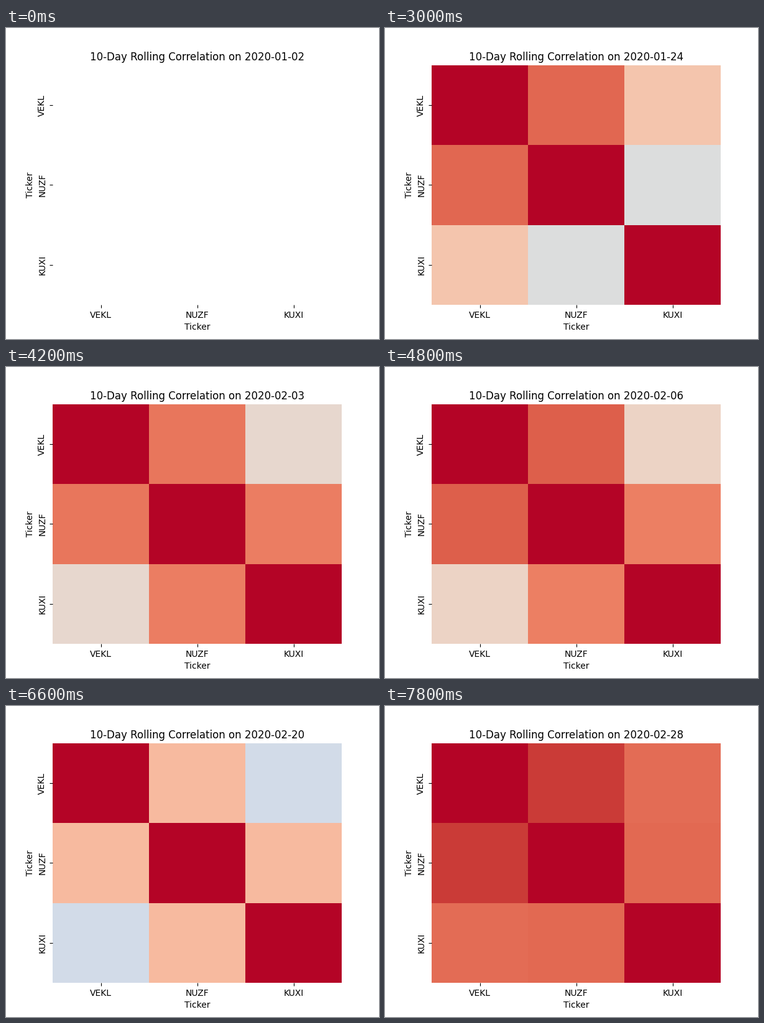
These frames come from a looping animation (600 by 500 pixels, 8 s). A matplotlib script:

```python
import numpy as np
import matplotlib.pyplot as plt
from matplotlib.animation import FuncAnimation

FRAMES = 40
WINDOW = 10
TICKERS = ["VEKL", "NUZF", "KUXI"]
HOLIDAYS = ["2020-01-20", "2020-02-17"]

# Turning points of the correlation of each pair of tickers
KEY_DAYS = [10, 15, 18, 21, 24, 29, 33, 35, 39]
PAIRS = {
    (0, 1): [0.838, 0.724, 0.876, 0.664, 0.75, 0.603, 0.315, 0.69, 0.875],
    (0, 2): [0.194, 0.245, 0.154, 0.083, 0.13, 0.083, -0.08, 0.454, 0.696],
    (1, 2): [-0.048, -0.007, -0.04, 0.63, 0.62, 0.52, 0.315, 0.655, 0.712],
}

dates = np.busday_offset("2020-01-02", np.arange(FRAMES), holidays=HOLIDAYS)


def correlation(day):
    """Symmetric matrix, empty until a full window has passed."""
    if day < WINDOW:
        return np.ma.masked_all((3, 3))
    matrix = np.ma.array(np.eye(3))
    for (row, col), values in PAIRS.items():
        matrix[row, col] = matrix[col, row] = np.interp(day, KEY_DAYS, values)
    return matrix


fig, ax = plt.subplots(figsize=(6, 5), dpi=100)
mesh = ax.pcolormesh(correlation(0), cmap="coolwarm", vmin=-1, vmax=1)
ax.set(xlim=(0, 3), ylim=(3, 0), xlabel="Ticker", ylabel="Ticker")
ax.spines[:].set_visible(False)
ticks = np.arange(3) + 0.5
ax.set_xticks(ticks, TICKERS)
ax.set_yticks(ticks, TICKERS, rotation="vertical", va="center")
title = ax.set_title("")


def update(day):
    mesh.set_array(correlation(day))
    title.set_text(f"{WINDOW}-Day Rolling Correlation on {dates[day]}")
    return mesh, title


anim = FuncAnimation(fig, update, frames=FRAMES, interval=200,
                     repeat=True, repeat_delay=0, blit=False)
plt.show()
```
